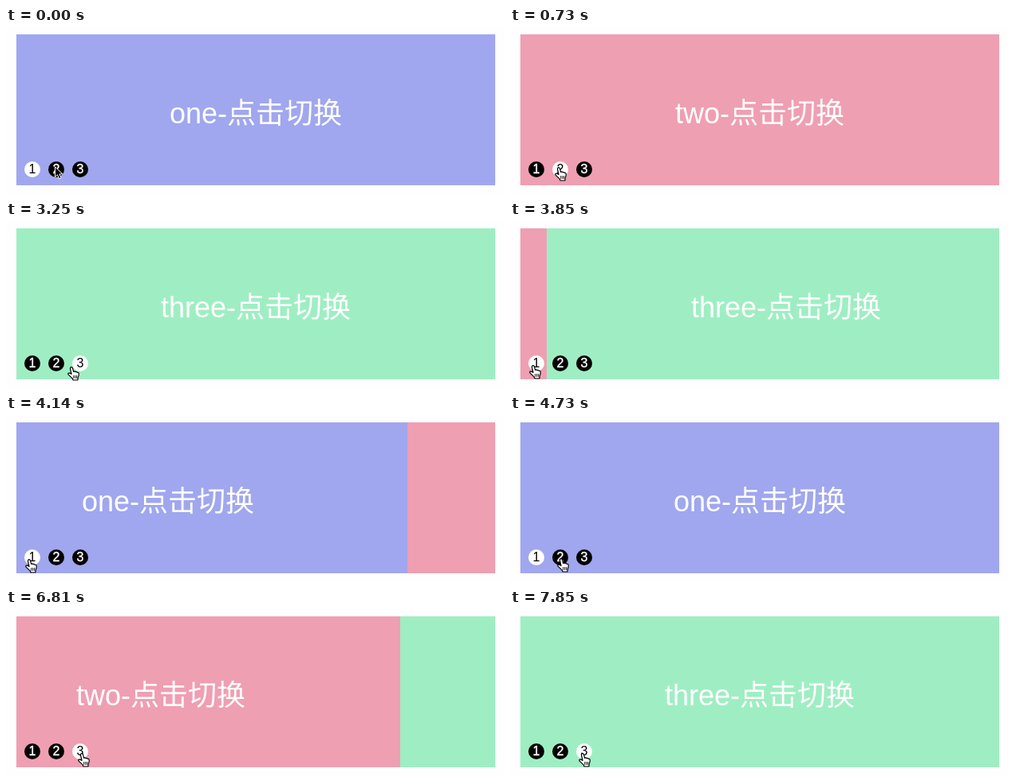
Recreate the animation shown at these times as an HTML page. Size 624 px wide and 209 px high, loop 8000 ms.

```html
<!DOCTYPE html>
<html lang="zh">
<head>
<meta charset="utf-8">
<style>
  html, body { margin: 0; width: 100%; height: 100%; overflow: hidden; background: #fefefe; }
  svg { display: block; }
  text { font-family: "Liberation Sans", "Noto Sans CJK SC", "Noto Sans CJK", sans-serif; text-anchor: middle; fill: #fff; }
  .slide text { font-size: 36px; }
  .dot text { font-size: 16px; stroke: #fff; stroke-width: .4; }
  .dot.active circle { fill: #fff; }
  .dot.active text { fill: #000; stroke: none; }
</style>
</head>
<body>
<svg id="stage" width="624" height="209" viewBox="0 0 624 209">
  <svg x="13" y="8" width="600" height="190" overflow="hidden"><g id="strip"></g></svg>
  <g id="dots"></g>
  <g id="arrow" transform="translate(61 174)">
    <path d="M.5 .8V13.5L3.5 10.8L5.7 15.8L8 14.8L5.9 9.9H10Z" fill="#000" stroke="#fff"/>
  </g>
  <g id="hand" stroke="#000" stroke-linecap="round" stroke-linejoin="round">
    <path fill="#fff" stroke-width="1.2" d="M5 9.5L3.5 3Q3.2 1 4.7 .7Q6.1 .6 6.6 2.4L7.6 6.4Q9.4 5.2 10 6.8Q11.5 5.8 12.2 7.5Q13.9 6.8 14.2 8.7Q14.6 11.4 13.2 13.6L12.9 17H7L6.3 15.2Q3.7 12.6 .9 9.8Q.4 8 2.4 8.2Q3.8 8.6 5 9.5Z"/>
    <path fill="none" stroke-width=".9" d="M7.7 11.5V14.5M9.7 11.5V14.5M11.6 11.5V14.5"/>
  </g>
</svg>
<script>
const LOOP = 8000, STEP = 148, LAST_STEP = 53, DURATION = 500, WIDTH = 600;
const slides = [["one", "#a0a7ee"], ["two", "#ef9fb2"], ["three", "#9feec3"]];
// Each click: time in ms and the slide it selects.
const clicks = [[180, 1], [1854, 2], [3826, 0], [5060, 1], [6730, 2]];
// Pointer path: step, x, y.
const pointer = [
  [1, 56, 175], [7, 56, 175], [10, 86, 179], [21, 86, 179], [22, 77, 182],
  [25, 24, 180], [29, 24, 180], [32, 59, 179], [39, 59, 179], [42, 90, 180],
  [52, 90, 180], [53, 86, 180]
];

const $ = id => document.getElementById(id);
$("strip").innerHTML = slides.map(([name, color], i) =>
  `<g class="slide" transform="translate(${i * WIDTH})">
    <rect width="${WIDTH}" height="190" fill="${color}"/>
    <text x="300" y="112">${name}-点击切换</text></g>`).join("");
$("dots").innerHTML = slides.map((_, i) =>
  `<g class="dot" transform="translate(${33 + 30 * i} 178)">
    <circle r="10"/><text y="5">${i + 1}</text></g>`).join("");
const dots = [...$("dots").children];

// Standard CSS "ease": cubic-bezier(.25, .1, .25, 1).
function ease(x) {
  if (x >= 1) return 1;
  let low = 0, high = 1;
  for (let i = 0; i < 24; i++) {
    const s = (low + high) / 2;
    if (.75 * s * (1 - s) + s ** 3 < x) low = s; else high = s;
  }
  const s = low;
  return .3 * s * (1 - s) ** 2 + 3 * s * s * (1 - s) + s ** 3;
}

function carouselAt(time) {
  let active = 0, position = 0;
  for (const [start, target] of clicks) {
    if (time < start) break;
    position = active + (target - active) * ease((time - start) / DURATION);
    active = target;
  }
  return { active, position };
}

function pointerAt(step) {
  const next = Math.max(1, pointer.findIndex(p => p[0] >= step));
  const [k0, x0, y0] = pointer[next - 1], [k1, x1, y1] = pointer[next];
  const f = (step - k0) / (k1 - k0);
  return [x0 + (x1 - x0) * f, y0 + (y1 - y0) * f].map(Math.round);
}

function draw(now) {
  // The picture advances in fixed steps, like a screen recording.
  const step = Math.min(LAST_STEP, Math.floor((now % LOOP + 10) / STEP));
  const { active, position } = carouselAt(step * STEP);
  $("strip").setAttribute("transform", `translate(${-Math.round(position * WIDTH)})`);
  dots.forEach((dot, i) => dot.classList.toggle("active", i === active));
  $("arrow").style.display = step < 1 ? "" : "none";
  $("hand").style.display = step < 1 ? "none" : "";
  if (step >= 1) $("hand").setAttribute("transform", `translate(${pointerAt(step)})`);
}

const begin = performance.now();
function tick() {
  draw(performance.now() - begin);
  requestAnimationFrame(tick);
}
tick();
</script>
</body>
</html>
```
